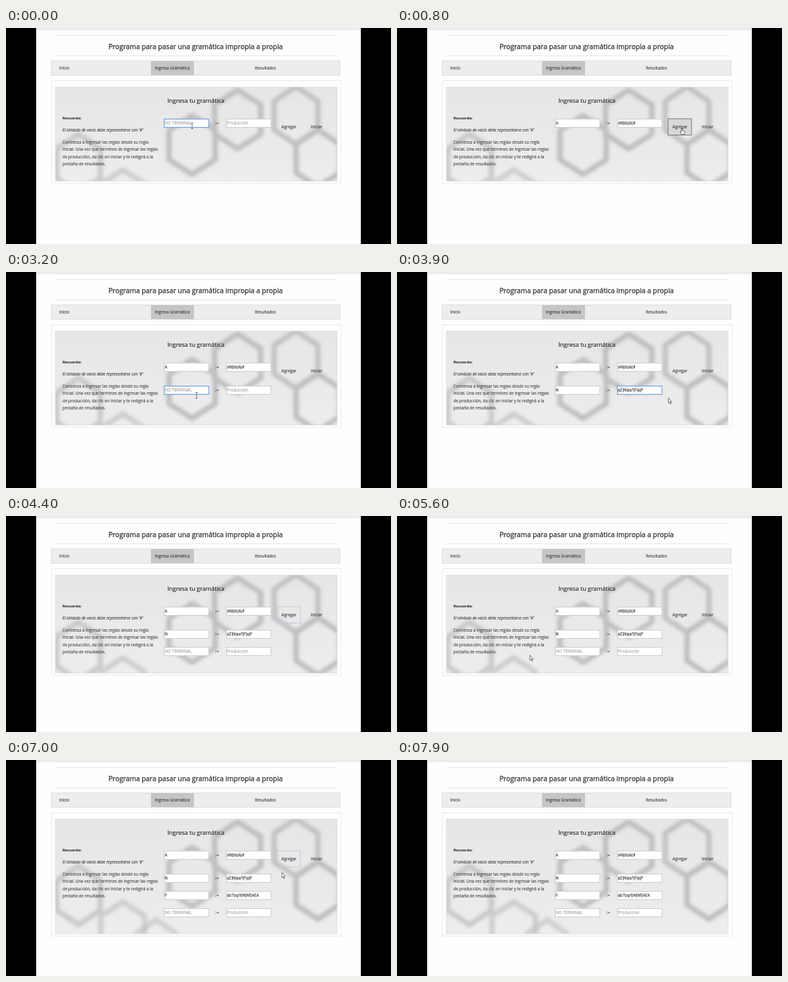
Recreate the animation shown at these times as an HTML page. Size 600 by 338 pixels, loop 8000 ms.

```html
<!DOCTYPE html>
<html lang="es">
<head>
<meta charset="utf-8">
<title>Gramática</title>
<style>
html, body { margin: 0; width: 100%; height: 100%; overflow: hidden; background: #000; }
svg { display: block; width: 100vw; height: 100vh; }
text { font-family: "Open Sans", "Noto Sans", sans-serif; font-size: 6.4px; fill: #303030; stroke: #303030; stroke-width: .1; white-space: pre; }
.title { font-size: 10.74px; stroke-width: .3; }
.head { font-size: 9.35px; stroke-width: .22; }
.para { font-size: 6.36px; fill: #3c3c3c; }
.sign { font-size: 7.5px; }
.field { fill: #fff; stroke: #c6c6c6; stroke-width: .9; }
.field.on { stroke: #6b9de0; stroke-width: 1.2; }
.value { font-family: Roboto, sans-serif; font-size: 6.3px; }
.value.hint { font-family: "Open Sans", "Noto Sans", sans-serif; font-size: 6.4px; fill: #858585; stroke: none; }
.mid { text-anchor: middle; }
.btn { fill: none; stroke: none; }
.btn.focus { stroke: #b9c6de; stroke-width: .9; }
.btn.hover { fill: #d8d8d8; stroke: #707070; stroke-width: 1; }
.hex { fill: none; stroke: #bfbfbf; stroke-width: 8.5; stroke-linejoin: round; }
.line { stroke: #e4e4e4; stroke-width: 1; }
</style>
</head>
<body>
<svg viewBox="0 0 600 338" preserveAspectRatio="none">
  <defs>
    <filter id="soft" x="-20%" y="-20%" width="140%" height="140%"><feGaussianBlur stdDeviation="2.9"/></filter>
    <linearGradient id="wash" x1="0" y1="0" x2="0" y2="1">
      <stop offset="0" stop-color="#e6e6e6"/><stop offset="1" stop-color="#ededed"/>
    </linearGradient>
    <clipPath id="crop"><rect class="inner" x="77" y="92.5" width="439" height="147"/></clipPath>
  </defs>
  <rect width="600" height="338"/>
  <rect x="47" width="506" height="338" fill="#fefefe"/>
  <rect x="47" width="506" height="3.5" fill="#e7ebeb"/>
  <path class="line" d="M78 11.5H515M78 43.5H515"/>
  <text class="title mid" x="295.5" y="32.5">Programa para pasar una gramática impropia a propia</text>

  <rect x="70.5" y="51.5" width="450" height="22.5" fill="#ededed" stroke="#dcdcdc"/>
  <rect x="226" y="52" width="67" height="22" fill="#c5c5c5"/>
  <text x="83" y="65.4">Inicio</text>
  <text x="232" y="65.4">Ingresa Gramática</text>
  <text x="388" y="65.4">Resultados</text>

  <rect id="outer" x="71" y="82.5" width="451" height="160" fill="#fefefe" stroke="#e8e8e8"/>
  <rect class="inner" x="77" y="92.5" width="439" height="147" fill="url(#wash)"/>
  <g clip-path="url(#crop)"><g id="hexes" filter="url(#soft)"></g></g>
  <rect class="inner" x="77" y="92.5" width="439" height="147" fill="none" stroke="#d9d9d9" stroke-width=".8"/>

  <text class="head mid" x="296" y="117">Ingresa tu gramática</text>
  <text x="88" y="143" style="font-size:6px;font-weight:700">Recuerda:</text>
  <text x="88" y="162.3" style="font-size:6.2px;font-style:italic">El símbolo de vacío debe representarse con '#'</text>
  <text class="para" x="88" y="180.8">Comienza a ingresar las reglas desde su regla</text>
  <text class="para" x="88" y="192.2">inicial. Una vez que termines de ingresar las reglas</text>
  <text class="para" x="88" y="203.5">de producción, da clic en iniciar y te redigirá a la</text>
  <text class="para" x="88" y="214.7">pestaña de resultados.</text>

  <g id="rows"></g>
  <path id="caret" d="M247.5 145V154" stroke="#333" stroke-width=".8"/>
  <rect id="add" class="btn" x="422.5" y="142" width="36.5" height="25.5"/>
  <text class="mid" x="441" y="156.8">Agregar</text>
  <text class="mid" x="484" y="156.8">Iniciar</text>

  <g id="mouse">
    <path data-kind="beam" d="M-1.7-4.5H1.7M0-4.5V4.5M-1.7 4.5H1.7" fill="none" stroke="#555" stroke-width=".8"/>
    <path data-kind="arrow" d="M0 0V8.2L1.8 6.6L3 9.4L4.1 8.9L3 6.2H5Z" fill="#fff" stroke="#333" stroke-width=".7"/>
    <path data-kind="hand" d="M0 .4Q.8-.4 1.5.5V3.5L5 4.4Q5.6 5 5.3 6.5L4.6 9.5H.5L-2 6Q-1.7 5 0 6.2Z" fill="#fff" stroke="#333" stroke-width=".7"/>
  </g>
</svg>
<script>
const LOOP = 8000;
const $ = s => document.querySelector(s);
const all = s => [...document.querySelectorAll(s)];

function make(tag, attrs, parent) {
  const el = document.createElementNS('http://www.w3.org/2000/svg', tag);
  for (const k in attrs) el.setAttribute(k, attrs[k]);
  return parent.appendChild(el);
}

// Background honeycomb: centre x, centre y, half width, radius, opacity
[[361, 143, 36, 46, 1], [290, 183, 36, 46, 1], [452, 137, 34, 45, .9], [486, 204, 34, 45, 1],
 [113, 212, 34, 46, .75], [182, 266, 34, 44, .65], [234, 292, 30, 42, .6]]
  .forEach(([x, y, w, r, o]) => make('path', {
    class: 'hex', opacity: o,
    d: `M${x} ${y - r}l${w} ${r / 2}v${r}l${-w} ${r / 2}l${-w} ${-r / 2}v${-r}Z`
  }, $('#hexes')));

// Each field: text, typing start, typing end, focus start, focus end
const rows = [
  { y: 142, from: 0, fields: [['A', 300, 300, 0, 300], ['xN|bb|A|#', 400, 400, 300, 800]] },
  { y: 178, from: 1000, fields: [['N', 3300, 3300, 3100, 3300], ['aZ|N|aa?|F|a|F', 3400, 3800, 3300, 4000]] },
  { y: 205, from: 4200, fields: [['F', 5900, 5900, 5800, 5900], ['ab7|op9|N|Nf|AEA', 6000, 6300, 5900, 6500]] },
  { y: 232, from: 6800, fields: [['', LOOP, LOOP, LOOP, LOOP], ['', LOOP, LOOP, LOOP, LOOP]] }
];
const hints = ['NO TERMINAL', 'Producción'];
for (const row of rows) {
  row.g = make('g', {}, $('#rows'));
  make('text', { class: 'sign', x: 325.8, y: row.y + 9.2 }, row.g).textContent = ':=';
  row.parts = [246, 343].map(x => [
    make('rect', { class: 'field', x: x + .5, y: row.y + .5, width: 69.5, height: 13 }, row.g),
    make('text', { class: 'value', x: x + 1.2, y: row.y + 9.2 }, row.g)
  ]);
}

// Pointer keys: time, x, y, shape
const path = [
  [0, 290, 153, 'beam'], [300, 290, 153, 'beam'], [400, 340, 33, 'arrow'], [500, 340, 33, 'arrow'],
  [800, 443, 157, 'hand'], [1000, 443, 157, 'hand'], [1100, 425, 210, 'arrow'], [1300, 320, 323, 'arrow'],
  [1400, 190, 224, 'arrow'], [1500, 190, 224, 'arrow'], [1800, 145, 116, 'beam'], [2400, 113, 109, 'beam'],
  [2600, 112, 108.5, 'beam'], [2900, 112, 108.5, ''], [3100, 297, 193, 'beam'], [3600, 297, 193, 'beam'],
  [3900, 423, 197, 'arrow'], [4000, 443, 157, 'hand'], [4100, 443, 157, 'hand'], [4200, 436, 230, 'arrow'],
  [4300, 410, 326, 'arrow'], [4400, 390, 345, ''], [4500, 350, 328, 'arrow'], [4800, 276, 111, 'arrow'],
  [4900, 276, 111, 'arrow'], [5000, 220, 32, 'arrow'], [5200, 112, 113.5, 'beam'], [5400, 112, 113.5, ''],
  [5600, 207, 217.5, 'arrow'], [5700, 240, 214, 'arrow'], [5800, 290, 212, 'beam'], [6200, 290, 212, 'beam'],
  [6400, 410, 188, 'arrow'], [6500, 443, 157, 'hand'], [6900, 443, 157, 'hand'], [7000, 430, 176, 'arrow'],
  [7200, 300, 35, 'arrow'], [7500, 111, 125, 'beam'], [7800, 111, 125, ''], [LOOP, 111, 125, '']
];
const within = (t, a, b) => t >= a && t < b;
const shapes = all('#mouse path');

function drawMouse(t) {
  const i = path.findIndex(k => k[0] > t) - 1;
  const [a, x, y, kind] = path[i], [b, x2, y2] = path[i + 1];
  const p = (t - a) / (b - a);
  $('#mouse').setAttribute('transform', `translate(${x + (x2 - x) * p} ${y + (y2 - y) * p})`);
  for (const s of shapes) s.style.display = s.dataset.kind === kind ? '' : 'none';
}

function drawRow(row, t) {
  row.g.style.display = t >= row.from ? '' : 'none';
  row.fields.forEach(([text, start, end, on, off], i) => {
    const [box, label] = row.parts[i];
    const p = end > start ? (t - start) / (end - start) : 1;
    const shown = t < start ? '' : text.slice(0, Math.max(1, Math.ceil(text.length * Math.min(1, p))));
    label.textContent = shown || hints[i];
    label.classList.toggle('hint', !shown);
    box.classList.toggle('on', within(t, on, off));
  });
}

// The panel grows with its rows, and overshoots once by a row
function panelBottom(t) {
  if (t < 4200) return 239.5;
  if (t < 6700) return 246;
  return t < 6800 ? 299 : 272;
}

function draw(t) {
  const bottom = panelBottom(t);
  for (const el of all('.inner')) el.setAttribute('height', bottom - 92.5);
  $('#outer').setAttribute('height', bottom + 3.5 - 82.5);
  rows.forEach(r => drawRow(r, t));
  $('#caret').style.display = within(t, 100, 300) ? '' : 'none';
  const hover = within(t, 800, 1000) || within(t, 4000, 4100) || within(t, 6500, 6700);
  const focus = within(t, 1000, 1700) || within(t, 4100, 4700) || within(t, 6700, 7300);
  $('#add').setAttribute('class', 'btn' + (hover ? ' hover' : focus ? ' focus' : ''));
  drawMouse(t);
}

const begin = performance.now();
function tick() {
  const t = Math.max(0, performance.now() - begin) % LOOP;
  draw(Math.floor(t / 100) * 100);
  requestAnimationFrame(tick);
}
tick();
</script>
</body>
</html>
```
